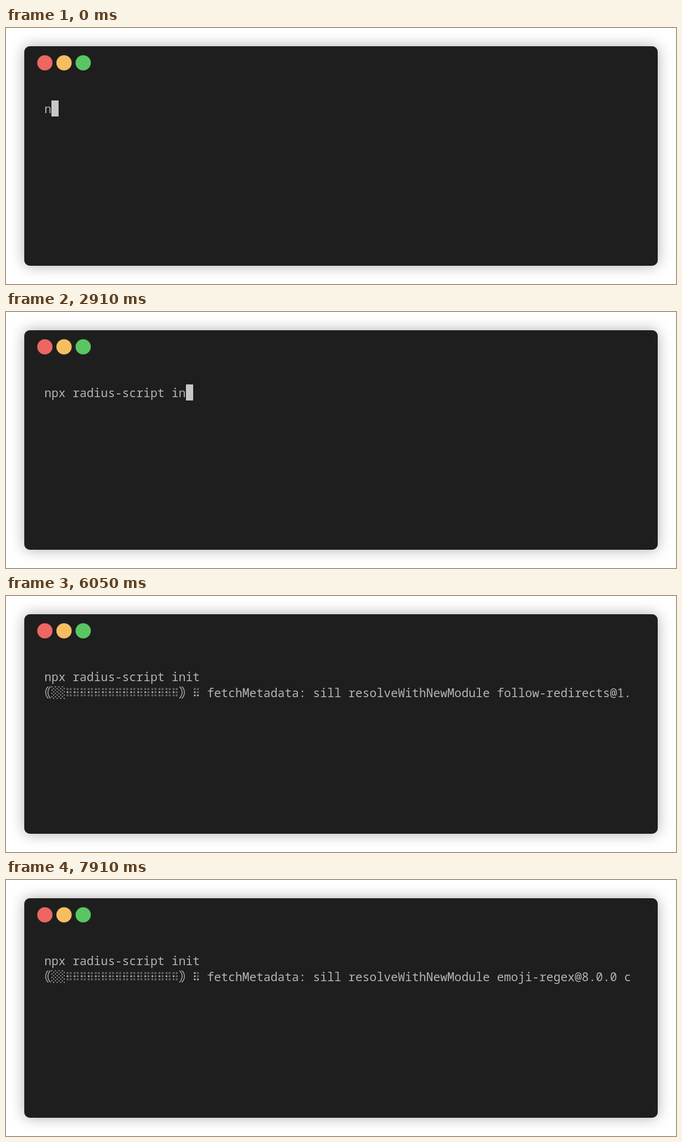
These frames come from a looping animation (1210x463 px, 8 s). An HTML page with a canvas:

```html
<!DOCTYPE html>
<html lang="en">
<head>
<meta charset="utf-8">
<title>Terminal</title>
<style>
  html, body { margin: 0; width: 100%; height: 100%; overflow: hidden; background: #fff; }
  .window {
    position: absolute; left: 33px; top: 33px; width: 1144px; height: 397px;
    border-radius: 10px; background: #1e1e1e; box-shadow: 0 0 26px rgba(0, 0, 0, .32);
  }
  canvas { position: absolute; left: 0; top: 0; }
</style>
</head>
<body>
<div class="window"></div>
<canvas width="1210" height="463"></canvas>
<script>
const ctx = document.querySelector('canvas').getContext('2d');
const LOOP = 8000, LEFT = 69.2, TOP = 131, CELL = 12.77, LINE = 29.3, COLUMNS = 83;
const FOREGROUND = '#b4b4b4', CURSOR = '#c7c7c7';
const COMMAND = 'npx radius-script init';
const SPINNER = '⠋⠙⠹⠸⠼⠴⠦⠧⠇⠏';
const BAR_CELLS = 18;

const steps = (from, to, count) =>
  Array.from({ length: count }, (_, i) => from + (to - from) * i / (count - 1));
const passed = (times, now) => times.filter(t => t <= now).length;

const keyTimes = [0, 80, 180, 650, 820, 900, 1040, 1150, 1360, 1490, 1690, 1970, 2130,
  ...steps(2300, 3010, 9)];
const ENTER = 3310, INSTALL = 4100;
const spinTimes = [...steps(INSTALL, 4870, 11), ...steps(4920, 5170, 5), ...steps(5230, 5630, 7),
  ...steps(5850, 6050, 4), ...steps(6250, 6700, 6), ...steps(6760, 6960, 4),
  ...steps(7060, 7610, 9), 7760, 7910];
const blockTimes = [4920, 5850];

const packages = [
  [4920, 'cli-table@0.3.1'], [5170, 'colors@1.0.3'], [5360, 'axios@0.19.2'],
  [6050, 'follow-redirects@1.5.10'], [6250, 'inquirer@7.1.0'], [6520, 'tmp@0.0.33'],
  [6700, 'os-tmpdir@1.0.2'], [7060, 'string-width@4.2.0'], [7910, 'emoji-regex@8.0.0'],
];

function disc(x, y, radius, color) {
  ctx.fillStyle = color;
  ctx.beginPath();
  ctx.arc(x, y, radius, 0, 2 * Math.PI);
  ctx.fill();
}

// Six dots, raised ones solid and the others hollow.
function braille(x, y, bits) {
  for (let i = 0; i < 6; i++) {
    const dotX = x + (i < 3 ? 3.6 : 9.2), dotY = y + 8 + (i % 3) * 5.7;
    if (bits >> i & 1) {
      disc(dotX, dotY, 1.7, FOREGROUND);
    } else {
      ctx.beginPath();
      ctx.arc(dotX, dotY, 1.3, 0, 2 * Math.PI);
      ctx.stroke();
    }
  }
}

function shade(x, y) {
  for (let row = 0; row < 8; row++)
    for (let col = 0; col < 4; col++)
      if ((row + col) % 2 === 0) {
        ctx.fillRect(x + col * CELL / 4, y + 3 + row * 3, 1.8, 1.8);
      }
}

function doubleParen(x, y, direction) {
  const middle = x + CELL / 2;
  ctx.save();
  ctx.lineWidth = 1.4;
  ctx.beginPath();
  for (const offset of [0, 4.2]) {
    const tip = middle + direction * (5 - offset);
    const bulge = tip - direction * 6.4;
    ctx.moveTo(tip, y + 3.5);
    ctx.bezierCurveTo(bulge, y + 9, bulge, y + 19, tip, y + 25);
  }
  ctx.stroke();
  ctx.restore();
}

function print(text, line) {
  const y = TOP + line * LINE;
  [...text].slice(0, COLUMNS).forEach((char, col) => {
    const x = LEFT + col * CELL, code = char.charCodeAt(0);
    ctx.fillStyle = ctx.strokeStyle = FOREGROUND;
    if (char === '⸨') doubleParen(x, y, 1);
    else if (char === '⸩') doubleParen(x, y, -1);
    else if (char === '░') shade(x, y);
    else if (code >> 8 === 0x28) braille(x, y, code & 255);
    else ctx.fillText(char, x, y + 22.7);
  });
}

function cursor(col, line) {
  ctx.fillStyle = CURSOR;
  ctx.fillRect(Math.round(LEFT + col * CELL), Math.round(TOP + line * LINE), 13, 29);
}

function status(now) {
  const blocks = passed(blockTimes, now);
  const bar = '░'.repeat(blocks) + '⠂'.repeat(BAR_CELLS - blocks);
  const spin = SPINNER[(passed(spinTimes, now) - 1) % SPINNER.length];
  const current = packages.filter(([start]) => start <= now).pop();
  const task = current
    ? `fetchMetadata: sill resolveWithNewModule ${current[1]} checking installable status`
    : 'rollbackFailedOptional: verb npm-session 75efe7a00d529af9';
  return `⸨${bar}⸩ ${spin} ${task}`;
}

function draw() {
  const now = performance.now() % LOOP;
  ctx.clearRect(0, 0, 1210, 463);
  ctx.font = '21.28px "Noto Sans Mono", "DejaVu Sans Mono", monospace';
  ctx.lineWidth = 0.8;
  ['#ed6762', '#f7be61', '#5ac663'].forEach((color, i) => disc(70.2 + i * 34.6, 63, 13.8, color));

  const typed = passed(keyTimes, now);
  print(COMMAND.slice(0, typed), 0);
  if (now < ENTER) cursor(typed, 0);
  else if (now < INSTALL) cursor(0, 1);
  else print(status(now), 1);
  requestAnimationFrame(draw);
}
draw();
</script>
</body>
</html>
```
